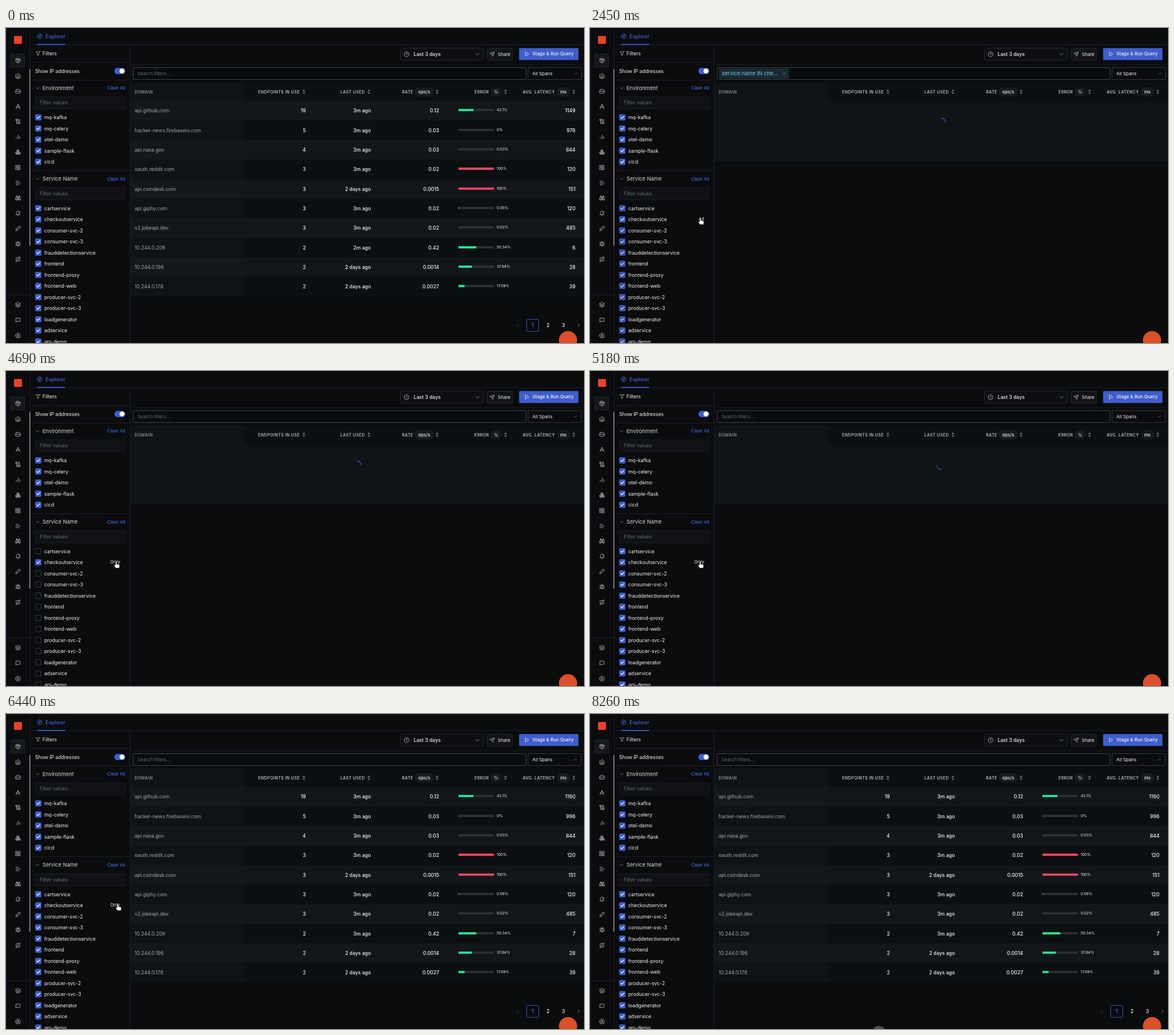
An HTML page that plays this animation: 1013 px wide and 553 px high, repeating every 8.33 s.

```html
<!DOCTYPE html>
<html lang="en">
<head>
<meta charset="utf-8">
<title>Domain explorer</title>
<style>
  html, body { margin: 0; width: 100%; height: 100%; overflow: hidden; background: #090b0d; }
  svg { display: block; width: 100vw; height: 100vh; font-family: Inter, sans-serif; letter-spacing: -.04px; }
  .icon { fill: none; stroke-width: 2; stroke-linecap: round; stroke-linejoin: round; }
  .head { letter-spacing: .45px; }
</style>
</head>
<body>
<svg id="stage" viewBox="0 0 1013 553"></svg>
<script>
const LOOP = 8330, STEP = 70;
const BLUE = '#4e74f8', FILL = '#3f5ecc', LINE = '#1b1d22', SOFT = '#c0c1c3', WHITE = '#f2f2f3';

// ---------- drawing helpers ----------
const rect = (x, y, w, h, fill, extra = '') =>
  `<rect x="${x}" y="${y}" width="${w}" height="${h}" fill="${fill}" ${extra}/>`;
const box = (x, y, w, h, stroke, fill = 'none', rx = 1) =>
  rect(x + .5, y + .5, w - 1, h - 1, fill, `stroke="${stroke}" rx="${rx}"`);
const text = (x, yMid, str, { size = 8.75, fill = WHITE, weight = 400, anchor = 'start', extra = '' } = {}) =>
  `<text x="${x}" y="${yMid + size * .364}" font-size="${size}" fill="${fill}" font-weight="${weight}" text-anchor="${anchor}" ${extra}>${str}</text>`;
const icon = (x, y, d, stroke = SOFT, size = 10) =>
  `<path class="icon" stroke="${stroke}" transform="translate(${x - size / 2} ${y - size / 2}) scale(${size / 24})" d="${d}"/>`;
const group = (id, body) => `<g id="${id}">${body}</g>`;
const ring = (x, y, r) => `M${x - r} ${y}a${r} ${r} 0 1 0 ${2 * r} 0a${r} ${r} 0 1 0 ${-2 * r} 0`;
const hexagon = (x, y) => `M${x} ${y - 5.2}l4.7 2.7v5l-4.7 2.7-4.7-2.7v-5zM${x - 4.7} ${y - 2.5}l4.7 2.7 4.7-2.7M${x} ${y}v5`;
const DOWN = 'M5 9l7 7 7-7', LEFT = 'M15 5l-7 7 7 7', RIGHT = 'M9 5l7 7-7 7';

// ---------- navigation rail ----------
const navIcons = [
  [57, 'M12 2l9 5v10l-9 5-9-5V7zM3 7l9 5 9-5M12 12v10M7.500 4.500l9 5'],
  [84, 'M3 9l9-7 9 7v11a2 2 0 0 1-2 2H5a2 2 0 0 1-2-2zM9 22V12h6v10'],
  [111, 'M22 12H2M5.500 5L2 12v6a2 2 0 0 0 2 2h16a2 2 0 0 0 2-2v-6l-3.500-7a2 2 0 0 0-1.800-1H7.300a2 2 0 0 0-1.800 1z'],
  [138, ring(12, 5, 2) + 'M3 21l8-14.300M13 6.700L21 21M20 11a9 9 0 0 1-16 0'],
  [164, 'M15 12h-5M15 8h-5M19 17V5a2 2 0 0 0-2-2H4M8 21h12a2 2 0 0 0 2-2v-1a1 1 0 0 0-1-1H11a1 1 0 0 0-1 1v1a2 2 0 1 1-4 0V5a2 2 0 1 0-4 0v2a1 1 0 0 0 1 1h3'],
  [191, 'M12 20V4M19 20V10M5 20v-6'],
  [218, hexagon(12, 7) + hexagon(7, 16.500) + hexagon(17, 16.500)],
  [245, 'M3 3h7v7H3zM14 3h7v7h-7zM14 14h7v7h-7zM3 14h7v7H3z'],
  [272, 'M3 5h12M3 12h18M3 19h14'],
  [298.5, 'M10 10h4M22 16H2M5 7V3h4v4M15 7V3h4v4M20 21a2 2 0 0 0 2-2v-4c0-1.400-2-3-2-5V8a1 1 0 0 0-1-1h-4a1 1 0 0 0-1 1v11a2 2 0 0 0 2 2zM4 21a2 2 0 0 1-2-2v-4c0-1.400 2-3 2-5V8a1 1 0 0 1 1-1h4a1 1 0 0 1 1 1v11a2 2 0 0 1-2 2z'],
  [325.5, 'M10 21a2 2 0 0 0 4 0M14 2.300A6 6 0 0 0 6 8c0 7-3 9-3 9h18s-2-1.500-2.700-5' + ring(18, 7, 3)],
  [352, 'M19 5l3-3M2 22l3-3M6 12l6 6-2.300 2.300a2.400 2.400 0 0 1-3.400 0l-2.600-2.600a2.400 2.400 0 0 1 0-3.400zM7.500 13.500L10 11M10.500 16.500L13 14M12 6l6 6 2.300-2.300a2.400 2.400 0 0 0 0-3.400l-2.600-2.600a2.400 2.400 0 0 0-3.400 0z'],
  [379, 'M8 2l2 2M14 4l2-2M9 7V6a3 3 0 1 1 6 0v1M12 20a6 6 0 0 1-6-6v-3a4 4 0 0 1 4-4h4a4 4 0 0 1 4 4v3a6 6 0 0 1-6 6zV11M6 13H2M22 13h-4M3 21c0-2 2-4 4-4M21 21c0-2-2-4-4-4M3 5c0 2 1.500 4 4 4M21 5c0 2-1.500 4-4 4'],
  [406, ring(6, 19, 3) + ring(18, 5, 3) + 'M9 19h8.500a3.500 3.500 0 0 0 0-7h-11a3.500 3.500 0 0 1 0-7H15'],
  [486, 'M12 2l10 5-10 5L2 7zM2 12l10 5 10-5M2 17l10 5 10-5'],
  [513, 'M21 15a2 2 0 0 1-2 2H7l-4 4V5a2 2 0 0 1 2-2h14a2 2 0 0 1 2 2z'],
  [540, ring(12, 12, 10) + ring(12, 10, 3) + 'M6 19c1-3 3-4 6-4s5 1 6 4'],
];
const rail = rect(14, 14, 14, 14, '#e8432c', 'rx="2"') + box(8, 45, 25, 24, '#212429', '#15171b', 2)
  + navIcons.map(([y, d]) => icon(21, y, d)).join('')
  + rect(0, 468, 42, 1, LINE) + rect(0, 0, 1, 553, LINE) + rect(42, 0, 1, 553, LINE)
  + rect(41.2, 72, 1.2, 310, '#b8b9bb');

// ---------- filter panel ----------
const environments = ['mq-kafka', 'mq-celery', 'otel-demo', 'sample-flask', 'cicd'];
const services = ['cartservice', 'checkoutservice', 'consumer-svc-2', 'consumer-svc-3', 'frauddetectionservice',
  'frontend', 'frontend-proxy', 'frontend-web', 'producer-svc-2', 'producer-svc-3', 'loadgenerator', 'adservice', 'api-demo'];
const KEPT = 1; // service that stays ticked

const option = (name, y, cls = '') => box(51.3, y - 5.4, 10.6, 10.6, '#3c3f45', 'none', 1.5)
  + `<g class="${cls}">${rect(51.3, y - 5.4, 10.6, 10.6, FILL, 'rx="1.500"')}`
  + `<path class="icon" style="stroke-width:1.300" stroke="#fff" d="M54 ${y}l1.900 1.900 3.500-3.800"/></g>`
  + text(67, y, name);
const section = (title, y) => icon(55.5, y, DOWN, SOFT, 8)
  + text(64, y, title, { size: 9.375, fill: '#d5d6d8' })
  + text(209, y, 'Clear All', { size: 8.125, fill: BLUE, anchor: 'end' })
  + box(51, y + 15, 158, 22, LINE, '#0f1114')
  + text(59, y + 25.5, 'Filter values', { fill: '#65686e' });

const panel = icon(56, 45, 'M22 3H2l8 9.500V19l4 2v-8.500z', SOFT, 9) + text(64, 45, 'Filters')
  + text(51, 75.5, 'Show IP addresses')
  + rect(190, 70, 19, 11, FILL, 'rx="5.500"') + '<circle cx="203.300" cy="75.500" r="4.300" fill="#fff"/>'
  + section('Environment', 105.5) + environments.map((n, i) => option(n, 157 + 19.5 * i)).join('')
  + section('Service Name', 265)
  + services.map((n, i) => option(n, 316.5 + 19.5 * i, i === KEPT ? '' : 'tick')).join('')
  + [[43, 29, 970, 1], [43, 60, 174, 1], [43, 91, 174, 1], [43, 250, 174, 1], [217, 29, 1, 524], [218, 64, 795, 1]]
    .map(r => rect(...r, LINE)).join('')
  + group('link', text(200, 335.5, '', { size: 8.125, anchor: 'end' }));

// ---------- toolbar ----------
const toolbar = icon(59, 14.5, ring(12, 12, 10) + 'M16 8l-2 6-6 2 2-6z', BLUE)
  + text(69.3, 14.5, 'Explorer', { size: 8.95, fill: BLUE }) + rect(54, 28.2, 50, 1.3, BLUE)
  + box(691, 35, 146, 22, '#24272c', '#0c0e11', 2) + icon(702, 46, ring(12, 12, 10) + 'M12 6v6l4 2')
  + text(714.5, 46, 'Last 3 days', { weight: 500 }) + icon(826.5, 46, DOWN, SOFT, 9)
  + box(843, 35, 45, 22, '#24272c', '#111317', 2) + icon(852, 46, 'M22 2l-7 20-4-9-9-4zM22 2L11 13', SOFT, 9)
  + text(862, 46, 'Share', { size: 8.125 })
  + rect(899.3, 35.3, 104, 21, FILL, 'rx="1.500"') + icon(913, 45.7, 'M6 3l14 9-14 9z', '#fff', 9)
  + text(922.5, 45.5, 'Stage &amp; Run Query', { size: 8.125, weight: 500 })
  + box(222.5, 69, 689.5, 22, '#424549') + box(914.5, 69, 94.5, 22, '#36393e')
  + text(922.5, 80, 'All Spans', { size: 8.125 }) + icon(998, 80, DOWN, '#777a80', 8)
  + group('hint', text(230.5, 80, 'Search filters...', { size: 8.125, fill: '#66696f' }))
  + group('chip', rect(226, 71, 122.5, 18, '#182a34', 'rx="1"')
    + text(231, 80, 'service.name IN che...', { size: 9.375, fill: '#7ac7e3' })
    + icon(340.5, 80, 'M5 5l14 14M19 5L5 19', '#7ac7e3', 6));

// ---------- table ----------
const BAR_X = 793, BAR_W = 62, ROW_H = 34.33;
const columns = [[442, 'ENDPOINTS IN USE', 522], [586, 'LAST USED', 636], [694, 'RATE', 755.5, 'ops/s', 733, 34],
  [821, 'ERROR', 875.5, '%', 859, 20], [905.5, 'AVG. LATENCY', 995, 'ms', 977, 24]];
const headStyle = { size: 7, weight: 600, fill: '#b9babd', extra: 'class="head"' };
const header = rect(218, 96, 795, 32, '#0c0f11') + rect(218, 96, 199, 32, '#101316')
  + text(225.5, 112, 'DOMAIN', { ...headStyle, fill: '#8b8d91' })
  + columns.map(([x, label, sortX, unit, unitX, unitW]) => text(x, 112, label, headStyle)
    + (unit ? rect(unitX - unitW / 2, 104, unitW, 16, '#171a1e', 'rx="8"')
      + text(unitX, 112, unit, { size: 7.8, weight: 600, fill: '#d3d4d6', anchor: 'middle' }) : '')
    + `<path fill="#6a6d72" d="M${sortX - 2.6} 111l2.600-3.200 2.600 3.200zM${sortX - 2.6} 112.800l2.600 3.200 2.600-3.200z"/>`).join('');

const row = ([domain, uses, used, rate, error, latency], i) => {
  const top = 128 + ROW_H * i, mid = 145.2 + ROW_H * i, barY = Math.round(142.3 + ROW_H * i), odd = i % 2;
  const cell = (x, str) => text(x, mid, str, { weight: 500, anchor: 'end' });
  const width = BAR_W * error / 100, color = error > 99 ? '#f0465f' : '#2bdd90';
  return rect(218, top, 795, ROW_H, odd ? '#0c0f11' : '#12161a') + rect(218, top, 199, ROW_H, odd ? '#0f1215' : '#14171a')
    + text(225.5, mid, domain, { fill: '#a3a5a9' })
    + cell(525.5, uses) + cell(639.5, used) + cell(759, rate) + cell(998, latency)
    + rect(BAR_X, barY, BAR_W, 4, '#2b2e32')
    + (error ? rect(BAR_X, barY, error < 1 ? Math.max(width, error > .05 ? .8 : 0) : width, 4, color)
      + rect(BAR_X, barY, 0, 4, '#121317', `class="sheen" data-width="${width}"`) : '')
    + text(860, barY + 1.8, error + '%', { size: 6.7 });
};
const pager = pages => {
  const first = 977 - 27 * (pages - 1);
  let out = icon(first - 26.5, 522, LEFT, '#55585d', 8) + icon(1003.5, 522, RIGHT, pages > 1 ? SOFT : '#55585d', 8)
    + box(first - 11, 511, 22, 22, '#3753b4');
  for (let i = 0; i < pages; i++)
    out += text(first + 27 * i, 522, i + 1, { weight: 500, anchor: 'middle', fill: i ? WHITE : BLUE });
  return out;
};
const table = (rows, pages) => header + rows.map(row).join('') + pager(pages);

const allRows = (firstMs, secondMs, used, ipMs) => [
  ['api.github.com', 19, '3m ago', '0.12', 42.1, firstMs],
  ['hacker-news.firebaseio.com', 5, '3m ago', '0.03', 0, secondMs],
  ['api.nasa.gov', 4, '3m ago', '0.03', .03, 844],
  ['oauth.reddit.com', 3, '3m ago', '0.02', 100, 120],
  ['api.coindesk.com', 3, '2 days ago', '0.0015', 100, 151],
  ['api.giphy.com', 3, '3m ago', '0.02', .06, 120],
  ['v2.jokeapi.dev', 3, '3m ago', '0.02', .02, 485],
  ['10.244.0.209', 2, used, '0.42', 50.34, ipMs],
  ['10.244.0.196', 2, '2 days ago', '0.0014', 37.84, 28],
  ['10.244.0.178', 2, '2 days ago', '0.0027', 17.08, 39],
];
const filteredRows = [['10.244.0.209', 1, '3m ago', '0.02', 0, 6]];

const spinner = header + rect(218, 128, 795, 106, '#0f1316')
  + `<path id="arc" class="icon" style="stroke-width:1.200" stroke="${FILL}" d="M615.500 158.200a7.300 7.300 0 0 1 7.300 7.300"/>`;

const pointer = group('arrow', '<path d="M0 0V10.200L2.400 8 4 11.600 5.600 10.900 4 7.400H7.300z" fill="#000" stroke="#fff" stroke-width=".9"/>')
  + group('hand', '<path d="M-1 6V.5a1 1 0 0 1 2 0V4.500l4.200.9c.8.2 1 .8.9 1.500L5.500 11.600H-.5L-3.600 7.600c-.6-.9.5-1.600 1.200-1z" fill="#fff" stroke="#111" stroke-width=".6"/>');
const clickRings = `<path id="click" fill="none" stroke="#8a8c8f" stroke-width="1.300" d="${ring(193, 336, 22)}"/>`
  + `<path id="endClick" fill="none" stroke="#8a8c8f" stroke-width="1.300" d="${ring(506.5, 559, 10.3)}${ring(506.5, 559, 7.5)}"/>`;

document.getElementById('stage').innerHTML = rect(0, 0, 1013, 553, '#090b0d') + rail + panel + toolbar
  + group('before', table(allRows(1149, 976, '2m ago', 6), 3))
  + group('filtered', table(filteredRows, 1))
  + group('after', table(allRows(1160, 996, '3m ago', 7), 3))
  + group('loading', spinner)
  + '<circle cx="985" cy="548" r="16" fill="#dc4f2d"/>' + clickRings + pointer;

// ---------- animation ----------
const FILTER = 2450, FILTERED = 2800, RESET = 4690, RELOADED = 5810, FADE = 280;
const path = [[350, 462, 549], [420, 420, 505], [560, 290, 400], [700, 195, 340], [840, 170.5, 331], [980, 170.5, 331],
  [1050, 170.5, 334], [1330, 170.5, 334], [1540, 156, 338], [1750, 191, 335], [2100, 193.5, 333.5], [4620, 193.5, 333.5],
  [4690, 193, 334.5], [6370, 193, 334.5], [6440, 196, 333.5], [6580, 300, 345], [6860, 700, 365], [7000, 852, 372],
  [7140, 840, 412], [7210, 800, 440], [7350, 690, 510], [7490, 632, 548], [7560, 627, 560]];

const $ = id => document.getElementById(id);
const clamp = v => Math.min(1, Math.max(0, v));
const show = (id, on) => $(id).style.display = on ? '' : 'none';
const linkLabel = document.querySelector('#link text');
const ticks = document.querySelectorAll('.tick'), sheens = document.querySelectorAll('.sheen');

function pointerAt(t) {
  const i = path.findIndex(p => p[0] > t);
  if (i < 1) return null;
  const [t0, x0, y0] = path[i - 1], [t1, x1, y1] = path[i], k = (t - t0) / (t1 - t0);
  return [x0 + (x1 - x0) * k, y0 + (y1 - y0) * k];
}

function drawSheen(t) {
  const start = t < FILTER ? 830 : 6290;
  const p = 1 - (1 - clamp((t - start) / 1920)) ** 5;
  const left = Math.max(0, (p - 1) / 2), right = Math.max(0, 1.5 * p - .5);
  for (const s of sheens) {
    s.setAttribute('x', BAR_X + s.dataset.width * left);
    s.setAttribute('width', s.dataset.width * (right - left));
    s.setAttribute('opacity', .5 * (1 - p));
  }
}

function draw(t) {
  const filtering = t >= FILTER && t < RESET;
  show('before', t < FILTER);
  show('filtered', t >= FILTERED && t < RESET);
  show('after', t >= RELOADED);
  show('loading', t >= FILTER && t < FILTERED || t >= RESET && t < RELOADED);
  show('chip', filtering);
  show('hint', !filtering);
  $('filtered').style.opacity = .5 + .5 * clamp((t - FILTERED) / FADE);
  $('after').style.opacity = .5 + .5 * clamp((t - RELOADED) / FADE);
  $('arc').setAttribute('transform', `rotate(${(t - (t < RESET ? FILTER : RESET)) * .36} 615.5 165.5)`);

  const ticked = t < RESET ? 1 - clamp((t - FILTER + 35) / 245) : clamp((t - RESET) / 210);
  ticks.forEach(g => g.style.opacity = ticked);
  linkLabel.textContent = filtering ? 'All' : 'Only';
  show('link', t >= 1470 && t < 6510);

  const pos = pointerAt(t), onLink = t >= 1680 && t < 6510;
  show('arrow', pos && !onLink);
  show('hand', pos && onLink);
  if (pos) $(onLink ? 'hand' : 'arrow').setAttribute('transform', `translate(${pos})`);
  show('click', t === 2240);
  show('endClick', t >= 8260);
  drawSheen(t);
}

function tick() {
  draw(Math.floor(performance.now() % LOOP / STEP) * STEP);
  requestAnimationFrame(tick);
}
tick();
</script>
</body>
</html>
```
